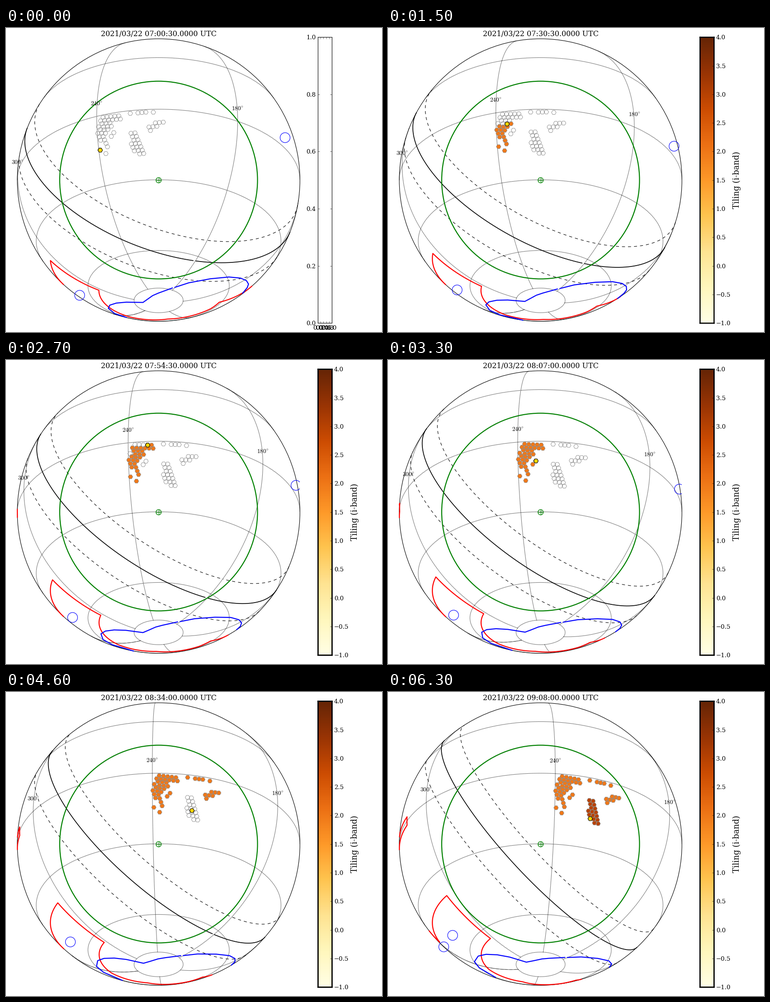
Write a matplotlib script that moves like this. It is 832x673 px and loops after 6.4 s.

```python
import numpy as np
import matplotlib.pyplot as plt
from matplotlib.animation import FuncAnimation
from matplotlib.patches import Circle, Rectangle

W, H, DPI = 832, 673, 80
FRAMES, INTERVAL = 64, 100
CX, CY, R = 337.7, 336.6, 312.7       # globe on the stage, in pixels
LAT = np.radians(-30.1)               # declination at the zenith
RA0, RA_RATE = 214.02, 0.2505         # zenith right ascension, degrees per minute
SLEWS = (32, 34, 46)                  # steps that start half a minute late

plt.rcParams.update({
    "font.family": "DejaVu Serif", "font.size": 12, "mathtext.fontset": "cm",
    "lines.dash_capstyle": "butt", "lines.scale_dashes": False,
})


def minutes(i):
    return 2 * i + 0.5 * sum(i >= s for s in SLEWS)


def project(ra, dec, ra_mid):
    """Sky degrees to stage pixels, plus depth (positive on the near side)."""
    d, h = np.radians(dec), np.radians(np.asarray(ra) - ra_mid)
    x = -np.cos(d) * np.sin(h)
    y = np.cos(LAT) * np.sin(d) - np.sin(LAT) * np.cos(d) * np.cos(h)
    z = np.sin(LAT) * np.sin(d) + np.cos(LAT) * np.cos(d) * np.cos(h)
    return CX + R * x, CY - R * y, z


def unproject(px, py, ra_mid):
    x, y = (px - CX) / R, (CY - py) / R
    z = np.sqrt(1 - x**2 - y**2)
    dec = np.arcsin(y * np.cos(LAT) + z * np.sin(LAT))
    h = np.arctan2(-x, z * np.cos(LAT) - y * np.sin(LAT))
    return ra_mid + np.degrees(h), np.degrees(dec)


def galactic(b):
    """Circle of galactic latitude b, sorted by RA with a small gap at 180."""
    l = np.linspace(0, 2 * np.pi, 1500)
    b, pole = np.radians(b), np.radians(27.1283)
    dec = np.arcsin(np.sin(b) * np.sin(pole) + np.cos(b) * np.cos(pole) * np.cos(l))
    ra = np.arctan2(np.cos(b) * np.sin(l),
                    np.cos(pole) * np.sin(b) - np.sin(pole) * np.cos(b) * np.cos(l))
    ra = (192.8595 + np.degrees(ra) - 180) % 360 + 180
    order = np.argsort(ra)
    order = order[ra[order] > 181.8]
    return ra[order], np.degrees(dec[order])


def densify(points, n=60):
    pts = np.array(points, float)
    k = np.arange(len(pts))
    t = np.linspace(0, k[-1], k[-1] * n + 1)
    return np.interp(t, k, pts[:, 0]), np.interp(t, k, pts[:, 1])


# Corners of the two survey outlines in RA, Dec
RED = [(94, -38), (98, -61.5), (85, -61.8), (45, -69.2), (5, -65.3), (-57, -65),
       (-53.9, -40), (-3, -40), (-3, -2), (-43, -2), (-43, 2), (40, 2)]
BLUE = [(184, -78.8), (214, -83.2), (240, -84.5), (282, -85), (311, -83.6), (315.5, -76.5),
        (322.5, -71.6), (331, -67.2), (340.5, -63.7), (355, -60.3), (367, -59.6),
        (387.3, -59.2), (420, -45), (454, -46.6), (463, -47.8), (469, -48.8), (477, -51.2),
        (486, -54.5), (497, -59.3), (510.3, -65.9), (527, -73), (540.3, -78)]
SPOTS = [(150, 5.4), (330.7, -51.3), (2.5, -40)]

# Tiles lie on a hexagonal lattice; each walk visits neighbours in observing order
EAST, SOUTH = np.array([8.7, -0.8]), np.array([3.2, 7.6])
STEPS = {"E": EAST, "W": -EAST, "S": SOUTH, "N": -SOUTH,
         "R": EAST - SOUTH, "L": SOUTH - EAST}
FIRST_FILTER = [
    (208, 270, ""), (221, 278, ""), (224.5, 263, "NNNNNLSS"), (220, 233, "NE"),
    (233, 217.5, "WWNEE"), (209.5, 205.5, "EEEEE"), (249.5, 194.5, "WWWW"), (205, 219, ""),
    (233, 240, "R"), (275, 189, ""), (292, 188, "EE"), (326, 186.5, ""),
    (348, 208.5, "WWSWWS"), (288.5, 260, ""),
]
SECOND_FILTER = [(289.5, 263.5, "SSENNNNNNWSSSWSS")]


def walk(x, y, moves):
    path = [np.array([x, y], float)]
    for move in moves:
        path.append(path[-1] + STEPS[move])
    return path


def tour(walks):
    return np.array([p for w in walks for p in walk(*w)])


first, second = tour(FIRST_FILTER), tour(SECOND_FILTER)
planned = np.vstack([first[:-1], second])     # the lone test tile is not outlined
TILE_SKY = unproject(*np.vstack([first, second]).T, RA0)
PLAN_SKY = unproject(*planned.T, RA0)
CMAP = plt.get_cmap("YlOrBr")
TILE_COLORS = CMAP([0.6] * len(first) + [0.8] * len(second))

fig = plt.figure(figsize=(W / DPI, H / DPI), dpi=DPI, facecolor="white")
ax = fig.add_axes([0, 0, 1, 1])
ax.set(xlim=(0, W), ylim=(H, 0))
ax.axis("off")

curves = []


def add_curve(ra, dec, **style):
    line, = ax.plot([], [], **style)
    curves.append((line, ra, dec))


dots = dict(color="k", lw=1, ls=(0, (1, 1)))
dashes = dict(color="k", lw=1, ls=(0, (6, 6)))

turn = np.linspace(0, 360, 721)
for dec in (-90, -80, -60, -30, 0, 30, 60):
    add_curve(turn, np.full_like(turn, dec), **dots)
arc = np.linspace(-80, 80, 400)
for ra in range(0, 361, 60):
    add_curve(np.full_like(arc, ra), arc, **dots)

ax.add_patch(Circle((CX, CY), R, fill=False, ec="k", lw=1))
add_curve(*galactic(0), color="k", lw=1.5)
add_curve(*galactic(10), **dashes)
add_curve(*galactic(-10), **dashes)

# Airmass 1.4 ring and the zenith mark
ring = R * np.sin(np.arccos(1 / 1.4))
ax.add_patch(Circle((CX, CY), ring, fill=False, ec="green", lw=2, zorder=3))
ax.add_patch(Circle((CX, CY + 0.4), 5.8, fill=False, ec="green", lw=1.6, alpha=0.8, zorder=3))
ax.plot([CX - 5, CX + 5], [CY + 0.4] * 2, color="green", lw=1, zorder=3)
ax.plot([CX] * 2, [CY - 4.6, CY + 5.4], color="green", lw=1, zorder=3)

add_curve(*densify(RED), color="red", lw=2, zorder=4)
add_curve(*np.array(BLUE).T, color="blue", lw=2, zorder=4)

hexagon = dict(marker="H", s=84)
done = ax.scatter([], [], linewidths=0, zorder=5, **hexagon)
plan = ax.scatter([], [], facecolors="none", edgecolors="0.55", linewidths=0.8, zorder=6, **hexagon)
now = ax.scatter([], [], facecolors="gold", edgecolors="k", linewidths=1, zorder=7, **hexagon)

spots = [Circle((0, 0), 11, fill=False, ec="blue", lw=1, zorder=5) for _ in SPOTS]
box = Rectangle((CX - R, CY - R), 2 * R, 2 * R, transform=ax.transData)
for spot in spots:
    ax.add_patch(spot)
    spot.set_clip_path(box)

labels = {ra: ax.text(0, 0, rf"${ra}^{{\circ}}$", ha="center", va="center", zorder=8)
          for ra in range(0, 360, 60)}
title = ax.text(CX, 18.4, "", fontsize=14.4, ha="center", va="baseline")

BAR = [689.7 / W, 1 - 653.3 / H, 31.6 / W, 633 / H]
TICK = dict(direction="in", length=4, width=0.5, pad=4)

blank = fig.add_axes(BAR, label="blank")
blank.tick_params(top=True, right=True, **TICK)
blank.set(xticks=np.arange(6) / 5, yticks=np.arange(6) / 5, xlim=(0, 1), ylim=(0, 1))
blank.spines[:].set_linewidth(1)

bar = fig.add_axes(BAR, label="bar")
bar.imshow(np.linspace(0, 1, 256)[:, None], cmap=CMAP, origin="lower",
           extent=(0, 1, -1, 4), aspect="auto")
bar.yaxis.tick_right()
bar.tick_params(**TICK)
bar.set(xticks=[], yticks=np.arange(-1, 4.1, 0.5))
bar.yaxis.set_major_formatter("{x:.1f}")
bar_label = fig.text(771.5 / W, 1 - 336.6 / H, "Tiling (i-band)", fontsize=16,
                     rotation=90, ha="center", va="center")


def update(i):
    mid = RA0 + RA_RATE * minutes(i)
    for line, ra, dec in curves:
        x, y, z = project(ra, dec, mid)
        line.set_data(np.where(z > 0, x, np.nan), y)

    tiles = np.column_stack(project(*TILE_SKY, mid)[:2])
    plan.set_offsets(np.column_stack(project(*PLAN_SKY, mid)[:2]))
    done.set_offsets(tiles[:i])
    done.set_facecolors(TILE_COLORS[:i])
    now.set_offsets(tiles[i:i + 1])

    for spot, (ra, dec) in zip(spots, SPOTS):
        x, y, z = project(ra, dec, mid)
        spot.center = x, y
        spot.set_visible(z > 0)
    for ra, label in labels.items():
        x, y, z = project(ra, 0, mid)
        label.set_position((x, y - 27.5))
        label.set_visible(z > 0)

    sec = round(7 * 3600 + 30 + 60 * minutes(i))
    title.set_text(f"2021/03/22 {sec // 3600:02d}:{sec // 60 % 60:02d}:{sec % 60:02d}.0000 UTC")
    blank.set_visible(i == 0)
    bar.set_visible(i > 0)
    bar.spines[:].set_linewidth(min(2.5, 1.4 + 0.06 * i))   # frame thickens as it is redrawn
    bar_label.set_visible(i > 0)
    return []


anim = FuncAnimation(fig, update, frames=FRAMES, interval=INTERVAL,
                     init_func=lambda: update(0), repeat=True, repeat_delay=0, blit=False)
plt.show()
```
